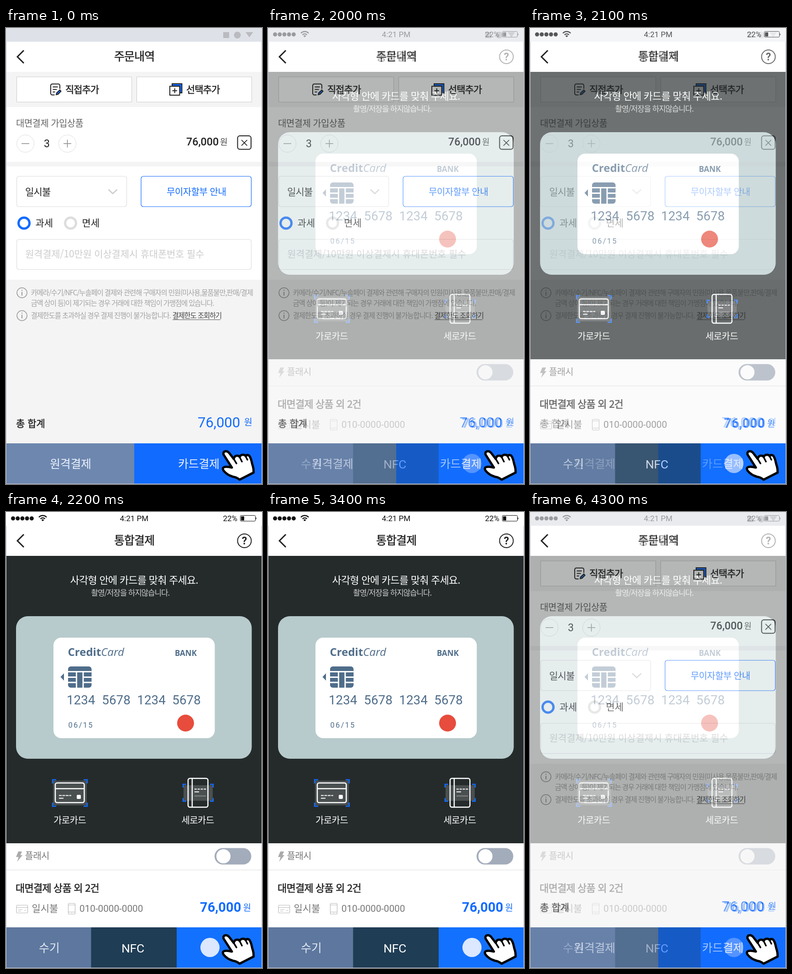
Animation, 561 px wide and 998 px high, one loop 4.4 s. Source, as an HTML page:

```html
<!DOCTYPE html>
<html lang="ko">
<head>
<meta charset="utf-8">
<title>결제 화면</title>
<style>
html, body { margin: 0; width: 100%; height: 100%; overflow: hidden; background: #fff; }
svg { display: block; width: 561px; height: 998px; }
text { font-family: "Noto Sans CJK KR", "Noto Sans CJK", sans-serif; white-space: pre; }
.num { font-family: Roboto, sans-serif; }
.card { font-family: "Open Sans", sans-serif; }
.mid { font-weight: 500; }
.bold { font-weight: 700; }
.semi { fill: #222; stroke: #222; stroke-width: .5px; }
.title { font-size: 25px; letter-spacing: -.95px; }
.big { font-size: 25px; letter-spacing: -.3px; }
.note { font-size: 15.5px; letter-spacing: -1.2px; fill: #a3a3a3; }
.line { fill: none; }
</style>
</head>
<body>
<svg viewBox="0 0 561 998">
  <defs>
    <path id="back" d="M39 49L25 63l14 14" fill="none" stroke="#222" stroke-width="3"/>
    <g id="info" fill="none" stroke="#999" stroke-width="1.5">
      <circle r="11"/><path d="M0-2V6M0-6.500v2" stroke-width="2"/>
    </g>
    <path id="frame" d="M.5 30V997.500H560.500V30" fill="none" stroke="#c3c7d9"/>
  </defs>

  <g id="order">
    <path fill="#fff" d="M0 0H561V998H0z"/>
    <path fill="#dee2e8" d="M0 0H561V30H0z"/>
    <g fill="#b9bbc0"><path d="M476 9h13v13h-13zM525 9h16.500l-8.250 11.500z"/><circle cx="507" cy="15.500" r="7.500"/></g>
    <path fill="#f4f4f4" d="M0 96H561v77H0zM0 293H561v10H0zM0 551H561V909H0z"/>
    <use href="#back"/>
    <text class="title semi" x="237" y="71">주문내역</text>

    <path fill="#fff" stroke="#ccc" d="M23.500 107h252v55h-252zM286.500 107h252v55h-252z"/>
    <g class="line" stroke="#222" stroke-width="2">
      <path d="M118 133v-7a3.500 3.500 0 0 0-3.500-3.500H101.500a3.500 3.500 0 0 0-3.500 3.500V143a3.500 3.500 0 0 0 3.500 3.500h5M102.500 129h11M102.500 134.500h9M102.500 140h5"/>
      <path d="M110 146l1-4 7-6.500 2.500 3-6.500 6.500z" fill="#126bff"/>
      <path d="M364 127v-5h21.500v20h-5V127z" fill="#126bff"/>
      <path d="M359 127.500h21.500V147H359zM369.750 132v10.500M364.500 137.250h10.500" fill="#fff"/>
    </g>
    <g class="semi" font-size="21" letter-spacing="-1">
      <text x="130" y="142">직접추가</text><text x="395" y="142">선택추가</text>
    </g>

    <text x="22" y="216" font-size="20" letter-spacing="-.6" fill="#666">대면결제 가입상품</text>
    <g class="line" stroke="#ddd"><circle cx="42.500" cy="253" r="19"/><circle cx="134.500" cy="253" r="19"/></g>
    <path d="M34 253h17M126 253h17M134.500 244.500v17" stroke="#888" stroke-width="1.500"/>
    <text class="num" x="83" y="261" font-size="23" fill="#222">3</text>
    <text class="num mid" x="395" y="257" font-size="23.300" fill="#222">76,000</text>
    <text x="469" y="256" font-size="18" fill="#444">원</text>
    <rect class="line" x="507.500" y="236" width="29.500" height="29.500" rx="5" stroke="#222" stroke-width="2"/>
    <path d="M516 245l12.500 12.500M528.500 245L516 257.500" stroke="#222" stroke-width="1.700"/>

    <g class="line" stroke="#ddd" stroke-width="1.200">
      <rect x="23.500" y="324.500" width="241" height="66.500" rx="5"/>
      <rect x="23.500" y="462.500" width="514" height="66" rx="5"/>
      <rect x="296" y="324.500" width="241.500" height="66.500" rx="5" stroke="#126bff"/>
    </g>
    <text x="42" y="366" font-size="21" letter-spacing="-.8" fill="#222">일시불</text>
    <path class="line" d="M224.500 353.500l9.500 9 9.500-9" stroke="#ccc" stroke-width="2.500"/>
    <text x="352" y="366" font-size="20" letter-spacing="-.5" fill="#126bff">무이자할부 안내</text>
    <g class="line" stroke-width="5"><circle cx="39.500" cy="427" r="12" stroke="#126bff"/><circle cx="141.500" cy="427" r="12" stroke="#ddd"/></g>
    <g font-size="21" fill="#222"><text x="64.500" y="434">과세</text><text x="166.500" y="434">면세</text></g>
    <text x="42" y="502" font-size="21" letter-spacing="-.2" fill="#ccc">원격결제/10만원 이상결제시 휴대폰번호 필수</text>

    <use href="#info" x="35" y="579.500"/><use href="#info" x="35" y="629.500"/>
    <g class="note">
      <text x="54.500" y="585">카메라/수기/NFC/누솔페이 결제와 관련해 구매자의 민원(미사용,물품불만,판매/결제</text>
      <text x="54.500" y="608">금액 상이 등)이 제기되는 경우 거래에 대한 책임이 가맹점에 있습니다.</text>
      <text x="54.500" y="635">결제한도를 초과하실 경우 결제 진행이 불가능합니다.</text>
      <text x="364.500" y="635" fill="#444">결제한도 조회하기</text>
    </g>
    <path d="M365 638.500H470" stroke="#555"/>

    <text class="semi" x="22" y="873" font-size="21">총 합계</text>
    <g fill="#126bff"><text class="num" x="420" y="874" font-size="31">76,000</text><text x="521.500" y="870" font-size="20">원</text></g>
    <path fill="#6d87af" d="M0 909H281v89H0z"/><path fill="#126bff" d="M281 909H561v89H281z"/>
    <use href="#frame"/>
    <g class="big" fill="#eef3ff"><text x="96" y="963">원격결제</text><text x="377" y="963">카드결제</text></g>
  </g>

  <g id="pay" opacity="0">
    <path fill="#fff" d="M0 0H561V998H0z"/>
    <path d="M15.500 14h45" stroke="#111" stroke-width="9" stroke-linecap="round" stroke-dasharray="0 10.200"/>
    <g class="line" stroke="#111" stroke-width="2.300"><path d="M72 11.500a11.500 11.500 0 0 1 17 0M75.500 15a7 7 0 0 1 10 0"/></g>
    <path d="M77.500 17.200a4.200 4.200 0 0 1 6 0l-3 3z" fill="#111"/>
    <g font-size="17" fill="#111"><text class="num" x="249.500" y="20">4:21 PM</text><text class="num" x="475.500" y="20">22%</text></g>
    <rect class="line" x="513.500" y="7.500" width="33" height="12.500" rx="2" stroke="#111"/>
    <path d="M515 9.500h7v9h-7zM547.500 11.500q3 2.500 0 5z" fill="#111"/>
    <use href="#back"/>
    <text class="title semi" x="237" y="71">통합결제</text>
    <circle class="line" cx="522.500" cy="63" r="15" stroke="#222" stroke-width="2"/>
    <text class="num bold" x="522.500" y="71" font-size="23" text-anchor="middle" fill="#222">?</text>

    <path fill="#252b2b" d="M0 96H561V725H0z"/>
    <g fill="#fff">
      <text x="140.500" y="157" font-size="22" letter-spacing="-.75">사각형 안에 카드를 맞춰 주세요.</text>
      <text x="186.500" y="183" font-size="17" letter-spacing="-1.200" fill="#ccc">촬영/저장을 하지않습니다.</text>
      <g font-size="20" letter-spacing="-.6"><text x="104" y="682">가로카드</text><text x="384.500" y="682">세로카드</text></g>
    </g>
    <rect x="22" y="228" width="516.500" height="312" rx="26" fill="#b7cacc"/>
    <rect x="104" y="275" width="353.500" height="220" rx="17" fill="#fff"/>
    <g fill="#4f6d8a">
      <text class="card bold" x="135.500" y="315" font-size="24">Credit<tspan font-weight="400" font-style="italic">Card</tspan></text>
      <text class="card bold" x="370" y="315" font-size="17">BANK</text>
      <g font-size="27.800">
        <text class="num" x="133" y="421">1234</text><text class="num" x="210.300" y="421">5678</text>
        <text class="num" x="287.300" y="421">1234</text><text class="num" x="364.300" y="421">5678</text>
      </g>
      <text class="num" x="136.500" y="472" font-size="16.500" letter-spacing="2.300">06/15</text>
      <path d="M127 353v16l-7.500-8z"/>
      <rect x="136" y="338" width="51.500" height="46.500" rx="6"/>
    </g>
    <path class="line" stroke="#fff" stroke-width="3" d="M136 349.500H187.500M136 361.500H154M136 373H154M170 361.500h18M170 373h18M154.500 349.500V385M169 349.500V385"/>
    <circle cx="393.500" cy="462" r="18.500" fill="#e74c3c"/>

    <path fill="#4a4f50" d="M103 588h74v54h-74zM389 598h64v34h-64z"/>
    <g class="line" stroke="#126bff" stroke-width="2.500">
      <path d="M102 594v-8h8M170 586h8v8M178 636v8h-8M110 644h-8v-8"/>
      <path d="M388 603v-7h7M447 596h7v7M454 626v7h-7M395 633h-7v-7"/>
    </g>
    <g class="line" stroke="#fff" stroke-width="2.500">
      <rect x="108" y="593" width="63.500" height="43" rx="4"/><path d="M108 605.500h63.500"/>
      <path d="M116 620.500h27" stroke-dasharray="6 1.500" stroke-width="2"/><path d="M116 626.500h10" stroke-width="2"/>
      <rect x="399" y="583" width="43.500" height="63" rx="4"/><path d="M408 583v63"/>
      <path d="M413 606.500h26" stroke-dasharray="5 1.800" stroke-width="2"/><path d="M413 612.500h10" stroke-width="2"/>
      <path d="M413 621.500h25" stroke="#888" stroke-width="2"/>
    </g>
    <rect x="155" y="619" width="9" height="9" rx="2" fill="#fff"/>

    <path d="M27 743h8l-3.500 8H36L24.500 765.500l3-10.500H22z" fill="#aaa"/>
    <text x="41.500" y="760" font-size="20" letter-spacing="-.6" fill="#777">플래시</text>
    <rect x="457" y="735.500" width="80.500" height="36" rx="18" fill="#a3acbb"/><circle cx="476.500" cy="753.500" r="15.500" fill="#fff"/>
    <path d="M0 783.500H561" stroke="#ddd"/>
    <text class="semi" x="21" y="831" font-size="22" letter-spacing="-.8">대면결제 상품 외 2건</text>
    <g class="line" stroke="#bbb" stroke-width="1.200">
      <rect x="23" y="860.500" width="24.500" height="17" rx="1.500"/><path d="M23 865.500h24.500M27 870h9M27 873.500h6M40 872h4"/>
      <rect x="136.500" y="856.500" width="15" height="23.500" rx="2"/><path d="M136.500 860h15M136.500 875.500h15M143 878h2"/>
    </g>
    <text x="56.500" y="875" font-size="21" letter-spacing="-.1" fill="#777">일시불</text>
    <text class="num" x="161" y="875" font-size="20.700" fill="#777">010-0000-0000</text>
    <g fill="#126bff"><text class="num bold" x="425" y="875" font-size="29">76,000</text><text x="519.500" y="873" font-size="19">원</text></g>
    <path fill="#5d779e" d="M0 909H187v89H0z"/><path fill="#1f3d54" d="M186.500 909H374v89H186.500z"/><path fill="#1371ff" d="M374 909H561v89H374z"/>
    <use href="#frame"/>
    <g class="big" fill="#fff"><text x="72" y="963" fill="#e6ecf5">수기</text><text class="num" x="253" y="963.500" font-size="26.500">NFC</text></g>
    <circle cx="447" cy="953" r="21" fill="#dbe8ff"/>
  </g>

  <g stroke="#000" stroke-width="5" stroke-linejoin="round" stroke-linecap="round">
    <path fill="#fff" d="M477 934Q475 928 480 926.500T489 930L499 943Q501 936 506 936T512 939Q514 934 519 934T525 937Q528 933 533 936C539 944 538 952 541 959Q543 966 542.500 973L512 988.500Q505 983 497 982Q484 978 477 969Q473 963 478 961T495 962Z"/>
    <path fill="none" stroke-width="3.500" d="M499 943l6 10M512 939l5 10M525 937l4 8"/>
  </g>
</svg>
<script>
const LOOP = 4400, HOLD = 2000, STEP = 100, STEPS = 3;
const pay = document.getElementById("pay");

// Stepped cross-fade: in after the first hold, out after the second.
function opacityAt(time) {
  const fadeIn = Math.floor((time - HOLD) / STEP) + 1;
  const fadeOut = Math.ceil((LOOP - time) / STEP);
  return Math.max(0, Math.min(fadeIn, fadeOut, STEPS)) / STEPS;
}

function draw(now) {
  pay.setAttribute("opacity", opacityAt(now % LOOP));
  requestAnimationFrame(draw);
}
requestAnimationFrame(draw);
</script>
</body>
</html>
```
